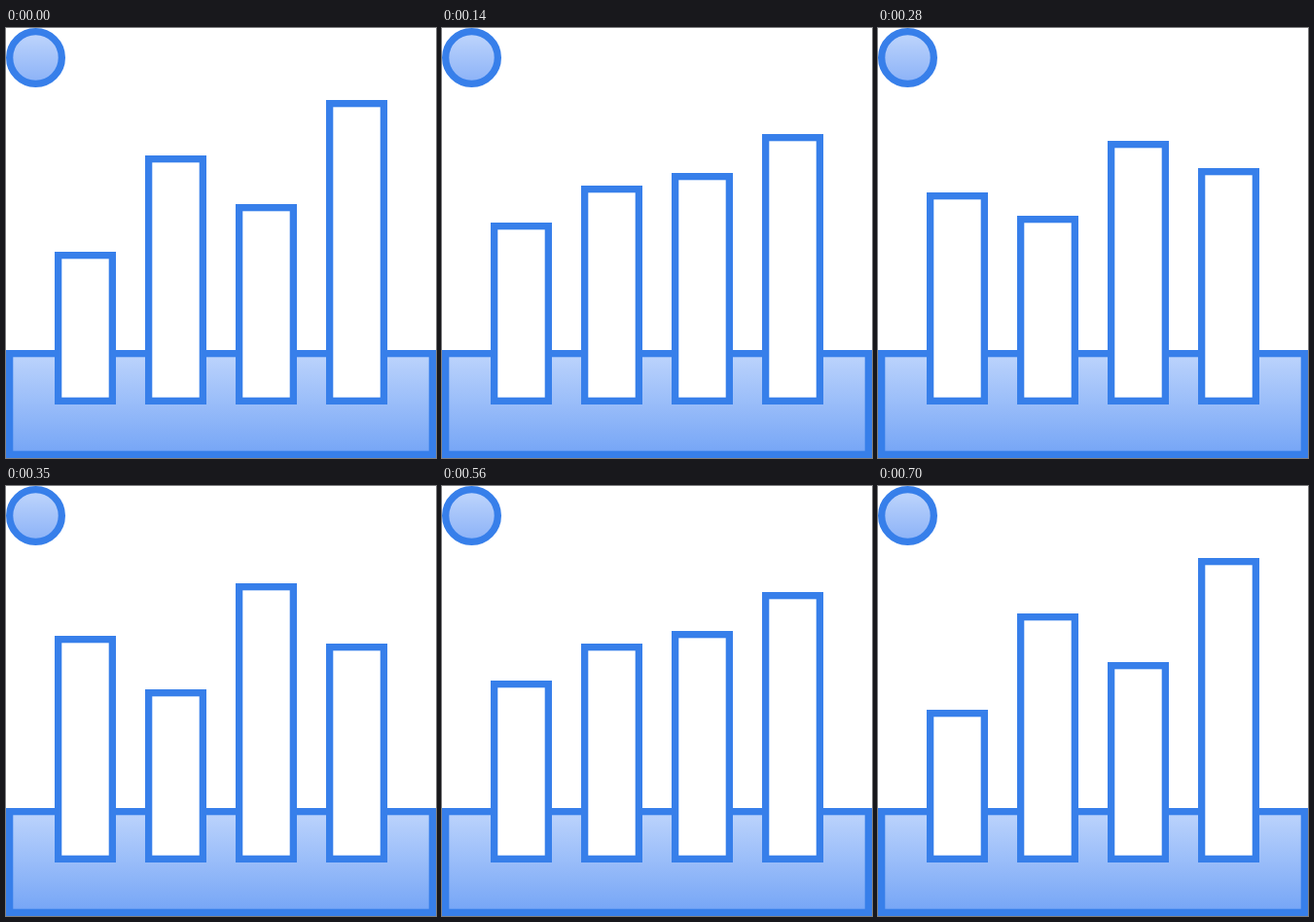
Recreate the animation shown at these times as an HTML page. Size 442 px wide and 442 px high, loop 0.77 s.

```html
<!DOCTYPE html>
<html lang="en">
<head>
<meta charset="utf-8">
<title>Bar chart</title>
<style>
  html, body { margin: 0; width: 100%; height: 100%; overflow: hidden; background: #fff; }
  svg { display: block; width: 100%; height: 100%; }
  .line { stroke: #377fea; stroke-width: 7.3; }
  .bar { fill: #fff; }
</style>
</head>
<body>
<svg id="stage" viewBox="0 0 442 442">
  <defs>
    <linearGradient id="dotFill" x1="0" y1="0" x2="0" y2="1">
      <stop offset="0" stop-color="#c0d6fc"/>
      <stop offset="1" stop-color="#8ab1f7"/>
    </linearGradient>
    <linearGradient id="baseFill" x1="0" y1="0" x2="0" y2="1">
      <stop offset="0" stop-color="#bdd4fc"/>
      <stop offset="1" stop-color="#75a5f6"/>
    </linearGradient>
  </defs>
  <circle class="line" cx="30.5" cy="30.5" r="26.85" fill="url(#dotFill)"/>
  <rect class="line" x="3.65" y="334.65" width="434.7" height="103.7" fill="url(#baseFill)"/>
</svg>
<script>
  const STEP = 70, STEPS = 11, HALF = 5;
  const LINE = 7.3, WIDTH = 63, BOTTOM = 387;
  const stage = document.getElementById("stage");

  const bars = [
    { x: 50, from: 230, to: 154 },
    { x: 143, from: 131, to: 209 },
    { x: 236, from: 181, to: 100 },
    { x: 329, from: 74, to: 162 }
  ];

  for (const bar of bars) {
    bar.el = document.createElementNS("http://www.w3.org/2000/svg", "rect");
    bar.el.setAttribute("class", "line bar");
    bar.el.setAttribute("x", bar.x + LINE / 2);
    bar.el.setAttribute("width", WIDTH - LINE);
    stage.append(bar.el);
  }

  // Bars swing linearly to their second height and back, in held steps.
  function draw(time) {
    const step = Math.floor(time / STEP) % STEPS;
    const p = 1 - Math.abs(step - HALF) / HALF;
    for (const { el, from, to } of bars) {
      const top = Math.round(from + (to - from) * p);
      el.setAttribute("y", top + LINE / 2);
      el.setAttribute("height", BOTTOM - top - LINE);
    }
  }

  let start;
  function tick(now) {
    start ??= now;
    draw(now - start);
    requestAnimationFrame(tick);
  }

  draw(0);
  requestAnimationFrame(tick);
</script>
</body>
</html>
```
